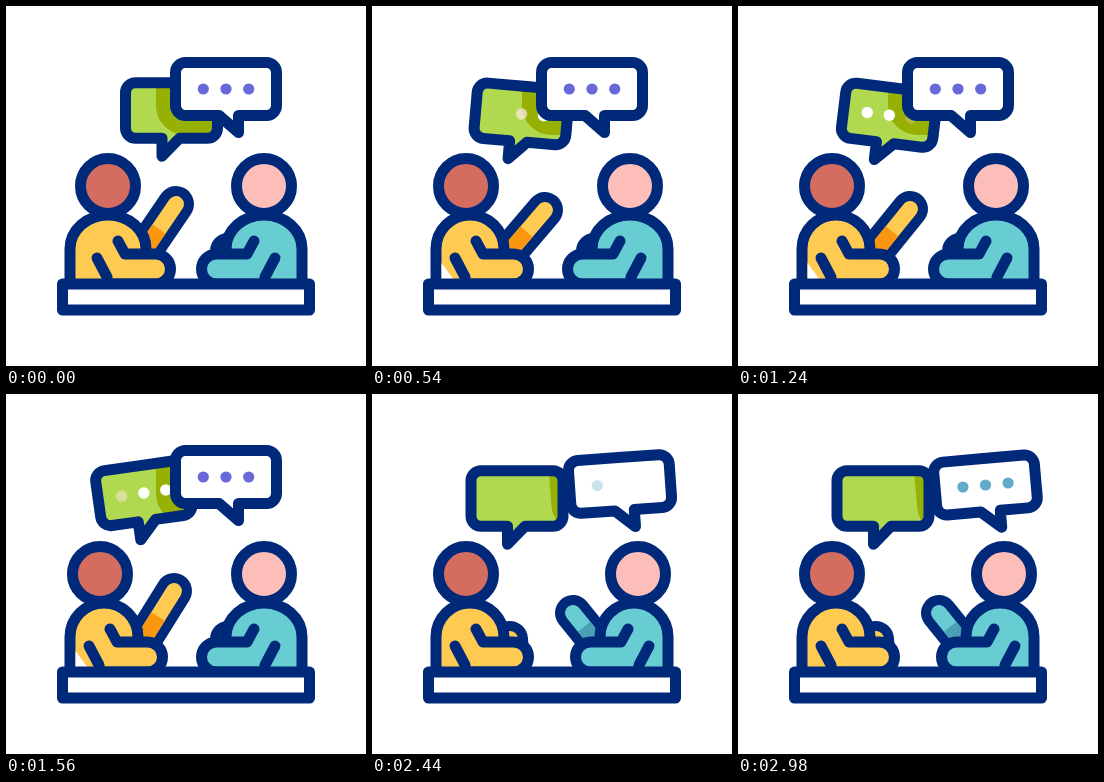
Recreate the animation shown at these times as an HTML page with a canvas. Size 360 by 360 pixels, loop 3000 ms.

```html
<!DOCTYPE html>
<html lang="en">
<head>
<meta charset="utf-8">
<title>Conversation</title>
<style>
html, body { margin: 0; width: 100%; height: 100%; overflow: hidden; background: #fff; }
canvas { display: block; width: 100vmin; height: 100vmin; }
</style>
</head>
<body>
<canvas width="360" height="360"></canvas>
<script>
const ctx = document.querySelector('canvas').getContext('2d');
const NAVY = '#00297a', LOOP = 3000, RAD = Math.PI / 180;

// Each key is [time, ...values]
const greenTilt = [[0, 0], [400, 0], [620, 7], [920, -7], [1240, 7], [1560, -8], [1940, 7], [2300, 0]];
const whitePose = [[1620, 220, 83, 0], [1940, 235, 87, 5.5], [2140, 246, 88, 5],
  [2440, 248, 90, -4], [2710, 248, 88, 5], [2980, 247.5, 91, -5]];
const leftHand = [[0, 170, 198], [540, 173, 204], [920, 156, 185], [1240, 172, 203],
  [1560, 168, 197], [1640, 168, 197], [1940, 162, 270], [2150, 140, 275]];
const rightHand = [[1620, 138, 255], [1940, 161, 240], [2140, 160, 222],
  [2440, 159, 219], [2710, 160, 225], [2980, 159, 219]];

const clamp = v => Math.min(1, Math.max(0, v));
const ramp = (t, start, length) => clamp((t - start) / length);
const ease = u => (1 - Math.cos(u * Math.PI)) / 2;
const mix = (a, b, u) => a + (b - a) * u;

function pose(keys, t) {
  const next = keys.findIndex(k => k[0] > t);
  if (next < 0) return keys[keys.length - 1].slice(1);
  if (next === 0) return keys[0].slice(1);
  const a = keys[next - 1], b = keys[next];
  const u = ease((t - a[0]) / (b[0] - a[0]));
  return a.slice(1).map((v, i) => mix(v, b[i + 1], u));
}

function draw(path, fill, width = 11) {
  if (fill) {
    ctx.fillStyle = fill;
    ctx.fill(path);
  }
  ctx.strokeStyle = NAVY;
  ctx.lineWidth = width;
  ctx.stroke(path);
}

function line(x1, y1, x2, y2, color, width, cap = 'round') {
  ctx.strokeStyle = color;
  ctx.lineWidth = width;
  ctx.lineCap = cap;
  ctx.beginPath();
  ctx.moveTo(x1, y1);
  ctx.lineTo(x2, y2);
  ctx.stroke();
  ctx.lineCap = 'round';
}

function dot(x, y, r, color, alpha = 1) {
  ctx.globalAlpha = alpha;
  ctx.fillStyle = color;
  ctx.beginPath();
  ctx.arc(x, y, r, 0, 7);
  ctx.fill();
  ctx.globalAlpha = 1;
}

// Rounded box around the origin; the tail runs from x = from to a tip below x = tip
function bubble(w, h, from, tip, drop) {
  const x = w / 2, y = h / 2, r = 10;
  const tail = [[from, y], [tip, y + drop], [tip, y]].sort((a, b) => from > tip ? 0 : -1);
  const p = new Path2D();
  p.moveTo(0, -y);
  p.arcTo(x, -y, x, y, r);
  p.arcTo(x, y, -x, y, r);
  if (from > tip) {
    p.lineTo(from, y); p.lineTo(tip, y + drop); p.lineTo(tip, y);
  } else {
    p.lineTo(tip, y); p.lineTo(tip, y + drop); p.lineTo(from, y);
  }
  p.arcTo(-x, y, -x, -y, r);
  p.arcTo(-x, -y, x, -y, r);
  p.closePath();
  return p;
}
const greenBubble = bubble(92, 55.5, 8, -9.5, 18);
const whiteBubble = bubble(101, 53, -7, 12.5, 17);

const frameOf = (x, y, tilt) => new DOMMatrix().translate(x, y).rotate(tilt);
function placed(path, frame) {
  const p = new Path2D();
  p.addPath(path, frame);
  return p;
}

function bubbles(t) {
  const [tilt] = pose(greenTilt, t);
  const slide = 20.5 * (1 - ease(ramp(t, 0, 430)));
  const greenFrame = frameOf(145 + slide + 0.9 * tilt, 104.5 + 0.68 * tilt, tilt);
  const whiteFrame = frameOf(...pose(whitePose, t));
  const green = placed(greenBubble, greenFrame), white = placed(whiteBubble, whiteFrame);

  ctx.save();
  ctx.clip(green);
  ctx.fillStyle = '#b1d94f';
  ctx.fill(green);
  ctx.strokeStyle = '#96b004';
  ctx.lineWidth = 39;
  ctx.stroke(white);
  for (let i = 0; i < 3; i++) {
    const a = ramp(t, 20 + 110 * i, 120) - ramp(t, 360 + 140 * i, 150)
      + ramp(t, 830 + 180 * i, 150) - ramp(t, 1500 + 180 * i, 150);
    const p = greenFrame.transformPoint({ x: 22.2 * (i - 1), y: 0 });
    dot(p.x, p.y, 5.7, `rgb(${mix(240, 255, a)},${mix(180, 255, a)},${mix(140, 255, a)})`, clamp(a));
  }
  ctx.restore();
  draw(green);

  draw(white, '#fff');
  for (let i = 0; i < 3; i++) {
    const back = ramp(t, 2380 + 180 * i, 180);
    const p = whiteFrame.transformPoint({ x: 22.7 * (i - 1), y: 0 });
    dot(p.x, p.y, 5.6, t < 2350 ? '#6868d8' : '#5fabc8', clamp(1 - ramp(t, 1780 + 180 * i, 180) + back));
  }
}

// Left-hand sitter; lean moves the head and forearm toward the middle
function person(lean, [hx, hy], skin, shirt, shade, gap) {
  const px = 138, py = 245, dx = 8 * lean;
  line(px, py, hx, hy, NAVY, 36);
  line(px, py, hx, hy, shirt, 16);
  line(px, py, mix(px, hx, 0.47), mix(py, hy, 0.47), shade, 16, 'butt');

  const rx = 34 + dx / 2;
  draw(new Path2D(`M64 278V243a${rx} 34 0 0 1 ${2 * rx} 0V278`), shirt);
  if (gap) {
    ctx.fillStyle = '#fff';
    ctx.fill(new Path2D('M69.5 257L82 274H69.5z'));
  }
  ctx.save();
  ctx.translate(dx, 0);
  draw(new Path2D('M104 235L111 248H141.5a15 15 0 0 1 0 30H98'), shirt);
  line(83, 252, 93, 271, NAVY, 11);
  const head = new Path2D();
  head.arc(94, 180, 27.5, 0, 7);
  draw(head, skin);
  ctx.restore();
}

function render(now) {
  const t = now % LOOP;
  ctx.fillStyle = '#fff';
  ctx.fillRect(0, 0, 360, 360);
  ctx.lineJoin = ctx.lineCap = 'round';
  bubbles(t);

  person(1 - ease(ramp(t, 0, 430)), pose(leftHand, t),
    '#d46d60', '#ffca51', '#fb970f', t > 400 && t < 1700);
  ctx.save();
  ctx.translate(360, 0);
  ctx.scale(-1, 1);
  person(1 - ease(ramp(t, 1680, 520)), pose(rightHand, t), '#fdbeb9', '#68cdd2', '#4a9fb4');
  ctx.restore();

  const table = new Path2D();
  table.rect(56.5, 278, 247, 26);
  draw(table, '#fff');
}

const start = performance.now();
function tick() {
  render(performance.now() - start);
  requestAnimationFrame(tick);
}
tick();
</script>
</body>
</html>
```
